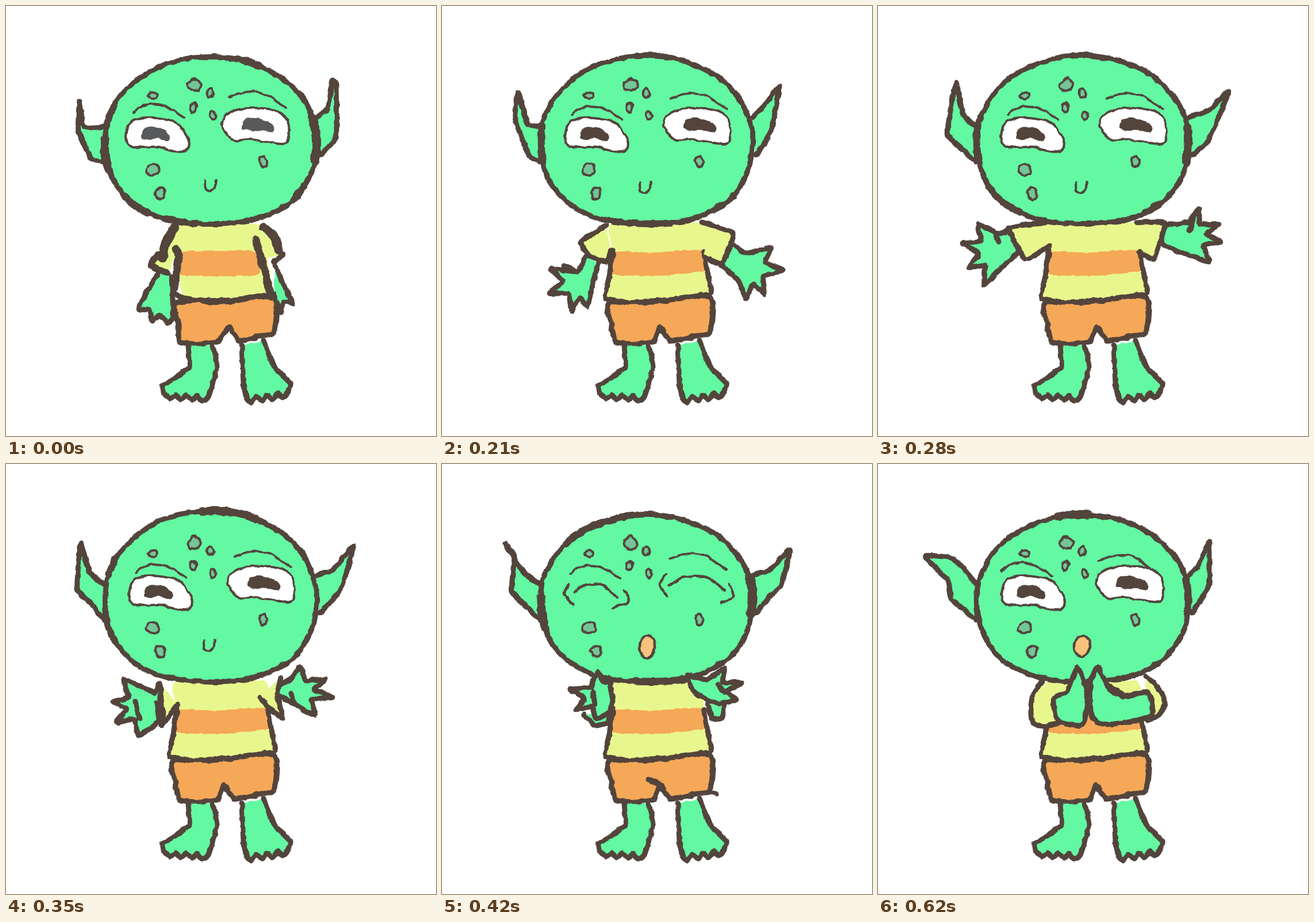
These frames come from a looping animation (748 by 748 pixels, 700 ms). An HTML page:

```html
<!DOCTYPE html>
<html lang="en">
<head>
<meta charset="utf-8">
<title>Little goblin</title>
<style>
html, body { margin: 0; width: 100%; height: 100%; overflow: hidden; background: #fff; }
svg { display: block; width: 100%; height: 100%; }
path { stroke-linecap: round; stroke-linejoin: round; }
</style>
</head>
<body>
<svg id="stage" viewBox="0 0 748 748">
  <filter id="rough" filterUnits="userSpaceOnUse" x="0" y="0" width="748" height="748" color-interpolation-filters="sRGB">
    <feTurbulence type="fractalNoise" baseFrequency=".07" numOctaves="2" seed="4"/>
    <feDisplacementMap in="SourceGraphic" scale="6" xChannelSelector="R" yChannelSelector="G"/>
  </filter>
</svg>
<script>
const LOOP = 700;
const INK = '#53443c';
const GREEN = '#63f8a2', YELLOW = '#e8f78d', ORANGE = '#f5a857', SPOT = '#74c597', MOUTH = '#f6c27c';
const ROUND = .16, SHARP = .07;
const stage = document.getElementById('stage');
let layer;

function make(tag, attrs, parent) {
  const el = document.createElementNS('http://www.w3.org/2000/svg', tag);
  for (const key in attrs) el.setAttribute(key, attrs[key]);
  return parent.appendChild(el);
}

const parse = text => text.trim().split(/\s+/).map(p => p.split(',').map(Number));

// Cardinal spline through the points; k sets how round the corners are.
function spline(pts, closed, k) {
  const n = pts.length;
  const at = i => closed ? pts[(i + n) % n] : pts[Math.max(0, Math.min(n - 1, i))];
  let d = 'M' + pts[0];
  for (let i = 0; i < (closed ? n : n - 1); i++) {
    const [p, a, b, q] = [at(i - 1), at(i), at(i + 1), at(i + 2)];
    const c1 = a.map((v, j) => v + (b[j] - p[j]) * k);
    const c2 = b.map((v, j) => v - (q[j] - a[j]) * k);
    d += `C${c1} ${c2} ${b}`;
  }
  return d + (closed ? 'Z' : '');
}

function shape(pts, { fill = 'none', width = 9, closed = false, k = SHARP, dx = 0, dy = 0 } = {}) {
  const list = (typeof pts === 'string' ? parse(pts) : pts).map(([x, y]) => [x + dx, y + dy]);
  make('path', {
    d: spline(list, closed, k), fill, stroke: width ? INK : 'none', 'stroke-width': width
  }, layer);
}

const line = (pts, width = 9) => shape(pts, { width });
const skin = pts => shape(pts, { fill: GREEN });
const patch = (pts, fill) => shape(pts, { fill, width: 0, closed: true });
const sleeve = (pts, k) => shape(pts, { fill: YELLOW, k });

// Fingers reach the tips; the gaps between them are pulled towards the palm.
function hand(from, tips, to, palm, pull = .42) {
  const [c] = parse(palm);
  const ends = parse(tips);
  const fingers = ends.flatMap((tip, i) => {
    const next = ends[i + 1];
    return next ? [tip, tip.map((v, j) => (v + next[j]) / 2 * (1 - pull) + c[j] * pull)] : [tip];
  });
  skin([...parse(from), ...fingers, ...parse(to)]);
}

function toes(x1, y1, x2, y2) {
  return Array.from({ length: 9 }, (_, i) =>
    `${x1 + (x2 - x1) * i / 8},${y1 + (y2 - y1) * i / 8 + (i % 2 ? 6 : -3)}`).join(' ');
}

function legs() {
  skin(`317,592 319,628 297,645 273,660 ${toes(275, 677, 352, 682)} 367,630 360,592`);
  skin(`410,590 413,655 ${toes(418, 685, 490, 674)} 495,656 466,627 448,582`);
}

function shorts(crotch = 379, left = 293) {
  shape(`${left},516 ${left + 2},555 302,584 335,588 369,584 ${crotch},558 ${crotch + 17},583 440,574 466,568 465,505`,
    { fill: ORANGE, closed: true });
}

function body() {
  patch('293,380 450,377 455,425 468,499 390,512 325,516 285,508 297,425', YELLOW);
  patch('300,428 365,429 452,425 458,460 385,469 296,467', ORANGE);
  line('297,425 291,470 284,508 325,516 390,512 440,505 468,499 461,460 456,428');
}

function ears(left, right) {
  skin(`172,210 ${left} 170,270`);
  skin(`540,194 ${right} 546,260`);
}

// Egg curve with a fuller lower half; angles run clockwise in degrees.
function rim(deg, top, phase) {
  const t = deg * Math.PI / 180, c = Math.cos(t), s = Math.sin(t);
  const power = s > 0 ? 2 / 2.38 : 1;
  const bump = 1 + .004 * Math.sin(9 * t + phase);
  const ry = s > 0 ? 147 : 232 - top;
  return [356 + 184 * bump * Math.sign(c) * Math.abs(c) ** power, 232 + ry * bump * Math.sign(s) * Math.abs(s) ** power];
}

function arc(from, to, top, phase) {
  const n = Math.ceil((to - from) / 6);
  return Array.from({ length: n + 1 }, (_, i) => rim(from + (to - from) * i / n, top, phase));
}

function head(top, phase, ...thick) {
  shape(arc(0, 354, top, phase), { fill: GREEN, closed: true, k: ROUND });
  for (const [from, to, width] of thick) shape(arc(from, to, top, phase), { width, k: ROUND });
}

function spot(x, y, rx, ry, seed) {
  const n = 6;
  const pts = Array.from({ length: n }, (_, i) => {
    const a = i * 2 * Math.PI / n + seed, r = 1 + .12 * Math.sin(seed * 5 + i * 2.4);
    return [x + rx * r * Math.cos(a), y + ry * r * Math.sin(a)];
  });
  shape(pts, { fill: SPOT, width: 4, closed: true, k: .1 });
}

function spots(seed) {
  spot(328, 137, 12, 11, seed);
  spot(355, 151, 6, 8, seed + 1);
  spot(256, 156, 9, 6, seed + 2);
  spot(326, 177, 6, 8, seed + 3);
  spot(360, 190, 6, 8, seed + 4);
  spot(255, 285, 11, 10, seed + 5);
  spot(448, 271, 7, 9, seed + 6);
  spot(268, 326, 9, 10, seed + 7);
}

function eyes(leftX = 0, rightX = 0, pupil = INK) {
  const white = { fill: '#fff', width: 4, closed: true, k: ROUND };
  const dark = { fill: pupil, width: 0, closed: true, k: ROUND };
  shape('214,228 221,203 240,195 272,195 302,204 323,235 318,252 300,253 270,245 240,246 221,243', { ...white, dx: leftX });
  shape('386,207 395,188 420,179 460,178 488,186 501,205 501,228 490,240 435,232 405,233', { ...white, dx: rightX });
  shape('240,225 247,212 268,210 288,222 287,236 268,231 245,232', { ...dark, dx: leftX });
  shape('420,211 425,198 443,194 473,205 474,219 455,217 425,215', { ...dark, dx: rightX });
}

function brows(leftX = 0, leftY = 0, rightX = 0, rightY = 0) {
  shape('225,189 246,176 278,177 313,198', { width: 4, k: ROUND, dx: leftX, dy: leftY });
  shape('397,161 422,153 455,154 495,180', { width: 4, k: ROUND, dx: rightX, dy: rightY });
}

const nose = (dx = 0, dy = 0) => shape('344,307 345,321 353,326 361,320 363,307', { width: 4, k: .1, dx, dy });

function mouth(x, y, rx, ry) {
  const pts = [0, 1, 2, 3, 4, 5, 6, 7].map(i => [x + rx * Math.cos(i * Math.PI / 4), y + ry * Math.sin(i * Math.PI / 4)]);
  shape(pts, { fill: MOUTH, width: 4.5, closed: true, k: ROUND });
}

function lookAhead(seed) {
  eyes();
  brows();
  nose();
  spots(seed);
}

function rest() {
  shorts(388, 298);
  hand('265,465 241,503', '231,527 254,547 281,551', '291,540 288,470', '268,505', .25);
  hand('469,452 485,490', '499,517 477,533', '465,500', '470,490', .3);
  patch('294,380 445,380 478,432 455,440 462,505 360,514 308,509 298,430 281,464 256,447', YELLOW);
  patch('304,428 432,427 440,467 380,470 300,467', ORANGE);
  line('290,498 308,509 360,514 400,512 440,505 468,506', 10);
  line('293,385 277,415 272,438', 16);
  line('264,432 252,452 281,464', 11);
  line('296,422 300,437 293,490', 13);
  line('448,385 468,402 474,425', 15);
  line('482,432 467,445', 10);
  line('434,406 444,438 461,505', 13);
  ears('136,210 128,165 126,216 148,265', '560,178 568,130 575,140 574,228');
  head(88, 0, [-15, 11, 16], [-75, -63, 13], [162, 180, 14], [122, 142, 13], [95, 112, 12], [30, 42, 13], [190, 203, 12]);
  eyes(-5, -10, '#58595a');
  brows(-4, -4, -9, -3);
  nose(2, -4);
  spots(0);
}

function spread() {
  shorts();
  hand('250,435 236,462', '190,457 187,500 226,530 253,523', '261,490 272,448', '240,480');
  line('212,452 236,462');
  hand('502,413 530,430', '573,420 593,460 561,501 529,509', '516,478 485,450', '535,455');
  body();
  sleeve('285,382 242,410 255,433 285,445 295,425');
  sleeve('452,376 507,396 487,448 457,436');
  ears('148,204 133,150 127,195 150,258', '560,174 587,140 574,210 560,240');
  head(86, 2, [80, 105, 12], [170, 190, 12], [38, 55, 11]);
  lookAhead(.4);
}

function wide() {
  shorts(381);
  hand('232,388 210,396', '174,379 147,413 158,455 185,485', '208,462 245,428', '205,425');
  line('205,396 210,410');
  hand('497,381 540,376', '558,352 593,379 597,410 575,445', '500,418 492,405', '540,400');
  line('549,365 543,390');
  body();
  sleeve('290,378 228,386 257,440 299,417');
  sleeve('455,428 480,440 499,377 450,377');
  ears('148,190 136,133 125,188 122,226', '578,180 610,148 584,215 568,242');
  head(86, 4, [-8, 12, 15], [170, 195, 12], [122, 150, 12], [45, 58, 12]);
  lookAhead(.8);
}

function reach() {
  shorts();
  hand('266,384 258,398 240,390', '205,375 186,414 192,450 231,472', '265,448 268,400', '238,420');
  line('225,413 232,444');
  line('262,416 267,448');
  hand('472,387 497,372', '513,354 555,374 567,406 537,437', '490,412 475,402', '505,395');
  line('496,400 502,417');
  body();
  sleeve('268,382 273,430 271,455 299,418');
  sleeve('441,405 455,422 481,442 472,402 478,372');
  ears('146,190 130,139 124,217 150,245', '570,183 604,143 592,190 580,222');
  head(81, 1, [-95, -65, 14], [152, 168, 11], [195, 208, 12]);
  lookAhead(1.2);
}

function closedEyes() {
  const lid = pts => shape(pts, { width: 4.5, k: ROUND });
  lid('220,210 213,226 228,244');
  lid('230,222 250,210 280,211 305,233');
  lid('317,220 324,240 296,250');
  lid('390,192 379,209 392,230');
  lid('395,212 420,197 460,197 492,220');
  lid('501,209 507,230 485,241');
}

function gather() {
  shorts();
  line('360,549 382,558');
  line('468,570 477,574');
  skin('247,435 265,455 288,450 292,432');
  skin('462,418 470,441 487,443 492,418');
  body();
  patch('448,378 490,360 470,400', YELLOW);
  ears('143,190 110,138 126,160 122,222', '572,183 605,150 590,212 570,230');
  head(88, 3, [220, 262, 13], [-14, 8, 17], [162, 180, 14], [72, 94, 13]);
  closedEyes();
  brows(-3, 2, -1, 4);
  mouth(357, 318, 13, 20);
  spots(1.6);
  hand('294,382 281,378', '270,361 224,392 233,427 268,443', '292,432 297,410 292,385', '275,405');
  line('262,396 266,418');
  hand('434,388', '427,367 491,355 521,380 512,410', '480,417 442,400 434,388', '465,395');
  line('480,383 492,398');
}

function clasp() {
  shorts();
  body();
  sleeve('285,380 270,400 266,430 270,450 290,456 318,450', ROUND);
  sleeve('465,370 482,382 499,412 490,435 470,445', ROUND);
  ears('132,165 82,160 122,203 128,235', '557,178 576,135 576,208 560,238');
  head(88, 5, [256, 273, 14], [-13, 6, 13]);
  eyes(1, -6);
  brows(-11, -3, -13, 7);
  mouth(355, 317, 14, 18);
  spots(2);
  const palm = { fill: GREEN, closed: true, k: .11 };
  shape('358,450 364,400 347,354 330,395 306,407 310,442 335,454', palm);
  shape('372,440 370,380 383,354 402,390 428,404 470,398 474,438 400,453', palm);
  line('403,389 424,402', 13);
}

const poses = [rest, spread, wide, reach, gather, clasp];
const STEP = 70;
// The first and last pose are held for three steps, the others for one.
const startOf = i => i === 0 ? 0 : i === poses.length ? LOOP : STEP * (i + 2);

poses.forEach((draw, i) => {
  layer = make('g', { filter: 'url(#rough)' }, stage);
  legs();
  draw();
  const start = startOf(i) / LOOP, end = startOf(i + 1) / LOOP;
  const keys = [{ offset: start, opacity: 1 }];
  if (start > 0) keys.unshift({ offset: 0, opacity: 0 });
  if (end < 1) keys.push({ offset: end, opacity: 0 });
  keys.push({ offset: 1, opacity: end < 1 ? 0 : 1 });
  keys.forEach(key => key.easing = 'step-end');
  layer.animate(keys, { duration: LOOP, iterations: Infinity });
});
</script>
</body>
</html>
```
